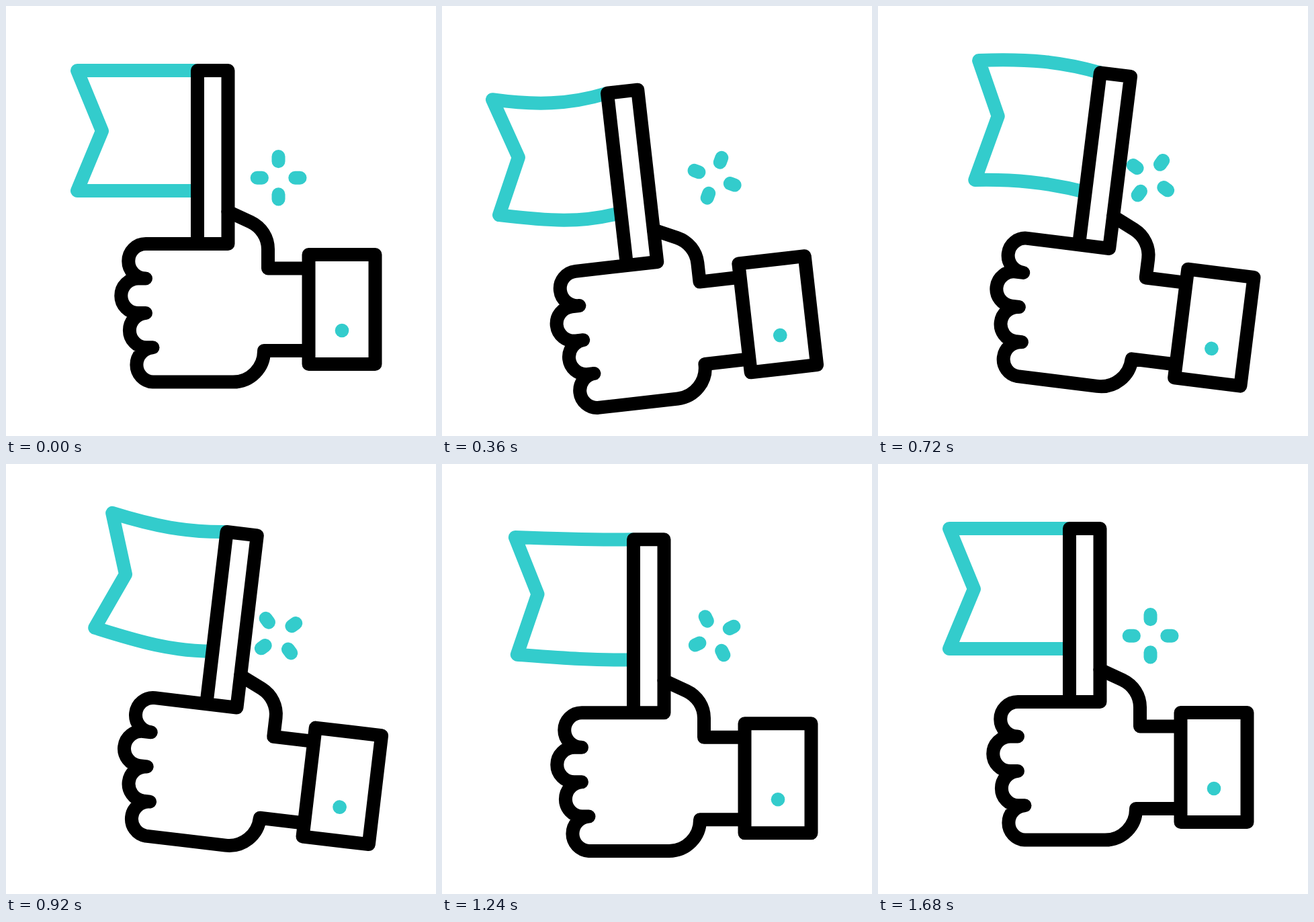
An HTML page that plays this animation: 640 by 640 pixels, repeating every 1760 ms.

```html
<!DOCTYPE html>
<html lang="en">
<head>
<meta charset="utf-8">
<title>Thumb with flag</title>
<style>
  html, body { margin: 0; width: 100%; height: 100%; overflow: hidden; background: #fff; }
  svg { display: block; width: 100%; height: 100%; }
  path, rect { fill: none; stroke: #000; stroke-width: 20; stroke-linecap: round; stroke-linejoin: round; }
  path.teal { stroke: #3cc; }
  circle { fill: #3cc; }
  #flag { stroke-linecap: butt; }
</style>
</head>
<body>
<svg viewBox="0 0 640 640">
  <path id="spark" class="teal" d="M405.5 224v7.2M405.5 280.3v7.2M373.7 255.7h7.2M430.3 255.7h7.2"/>
  <g id="hand">
    <path id="flag" class="teal"/>
    <path d="M285 354V96H330.5V354H208a25.7 25.7 0 0 0 0 51.5H197a25.7 25.7 0 0 0 0 51.5H208
      M197 457H208a25.7 25.7 0 0 0 0 51.3H218.5a25.7 25.7 0 0 0 0 51.3H338A46 46 0 0 0 384 513H450"/>
    <path d="M330.5 306L364 321.5C380 329 390 345 390 362V390.5H450"/>
    <rect x="450.5" y="370" width="99" height="163"/>
    <circle cx="500" cy="483" r="10.3"/>
  </g>
</svg>
<script>
const LOOP = 1760, STEP = 40;
const [spark, hand, flag] = ["spark", "hand", "flag"].map(id => document.getElementById(id));

// Cubic-bezier(.6, 0, .4, 1), solved for time by bisection
function ease(p) {
  let lo = 0, hi = 1, u = .5;
  for (let i = 0; i < 24; i++) {
    u = (lo + hi) / 2;
    const x = 1.8 * u * (1 - u) ** 2 + 1.2 * u * u * (1 - u) + u ** 3;
    if (x < p) lo = u; else hi = u;
  }
  return u * u * (3 - 2 * u);
}

// Keys are [time, ...values]; returns the eased values at time t
function track(keys, t) {
  const next = keys.findIndex(k => k[0] > t);
  if (next === 0) return keys[0].slice(1);
  if (next < 0) return keys[keys.length - 1].slice(1);
  const a = keys[next - 1], b = keys[next];
  const k = ease((t - a[0]) / (b[0] - a[0]));
  return a.slice(1).map((v, i) => v + (b[i + 1] - v) * k);
}

// Top tip x, y, top curve y1, y2, notch x, y, bottom tip x, y, bottom curve y1, y2
const flat = [106, 96, 96, 96, 143, 186, 106, 275, 275, 275];
const sag = [114, 86, 107, 102, 143, 176, 104.5, 258, 284.5, 275];
const arch = [103, 100.5, 86, 88, 142, 179, 120, 278, 267, 269];

const wave = [[40, ...flat], [340, ...sag], [660, ...arch], [1040, ...sag], [1450, ...arch], [1680, ...flat]];
const tilt = [[40, 0], [440, -6.8], [800, 8], [1170, 0]];
const drop = [[40, 0], [855, 28], [1680, 0]];
const spin = [[20, 0], [1620, 360]];

function draw(now) {
  const t = Math.floor(now % LOOP / STEP) * STEP;
  const [tx, ty, t1, t2, nx, ny, bx, by, b1, b2] = track(wave, t);
  flag.setAttribute("d", `M285 96C226 ${t1} 176 ${t2} ${tx} ${ty}L${nx} ${ny}L${bx} ${by}C176 ${b2} 226 ${b1} 285 275`);
  hand.setAttribute("transform", `translate(0 ${track(drop, t)}) rotate(${track(tilt, t)} 500 454)`);
  spark.setAttribute("transform", `rotate(${track(spin, t)} 405.5 255.7)`);
}

const start = performance.now();
function tick() {
  draw(performance.now() - start);
  requestAnimationFrame(tick);
}
tick();
</script>
</body>
</html>
```
